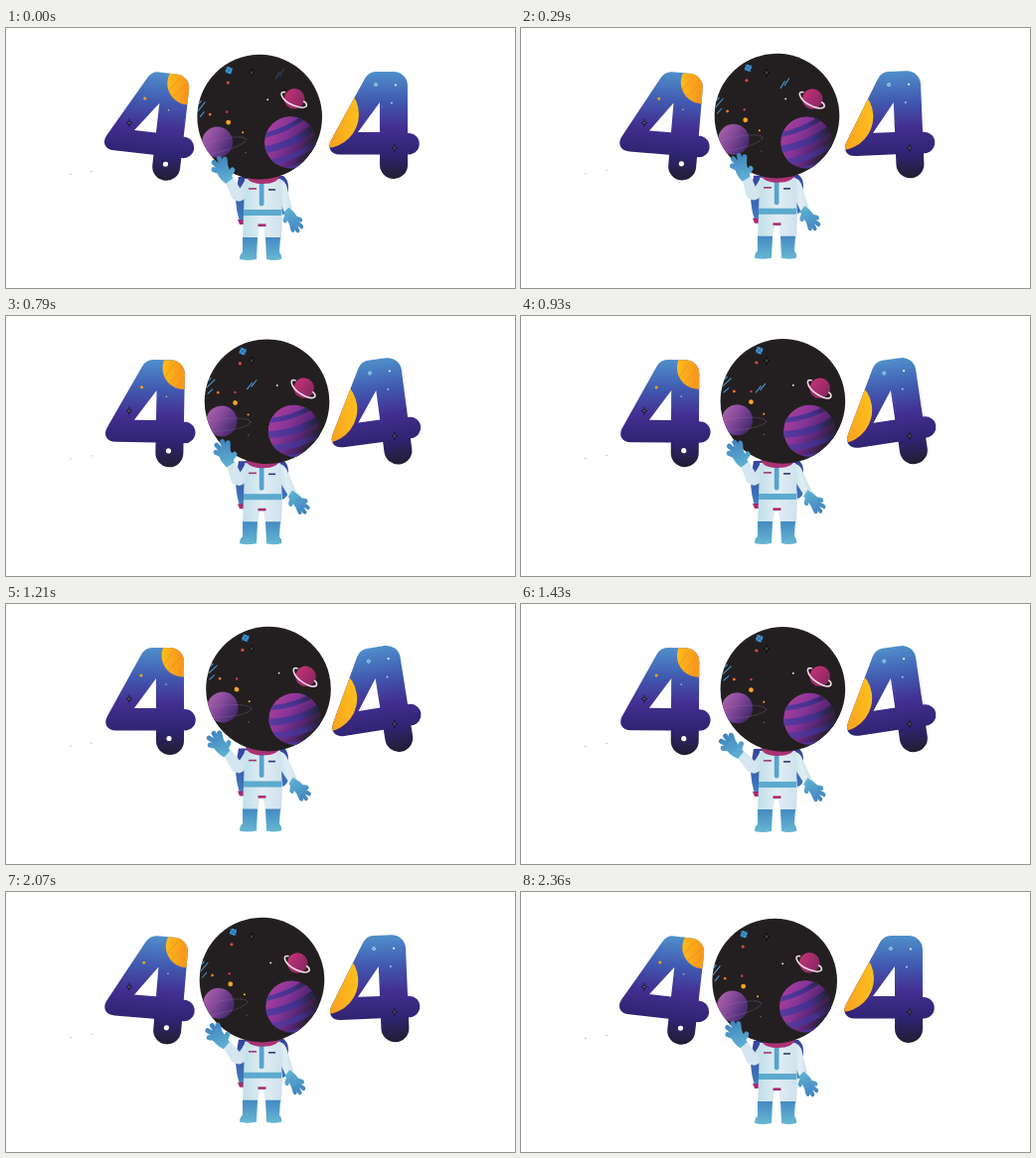
Write an HTML page that moves like this. It is 512 px wide and 262 px high and loops after 2430 ms.

```html
<!DOCTYPE html>
<html lang="en">
<head>
<meta charset="utf-8">
<title>404</title>
<style>
html, body { margin: 0; height: 100%; overflow: hidden; background: #fff; }
svg { display: block; width: 100%; height: 100%; }
.fingers { fill: none; stroke-width: 4.6; stroke-linecap: round; }
.meteor { fill: none; stroke: #4b9bd8; stroke-linecap: round; }
</style>
</head>
<body>
<svg viewBox="0 0 512 262">
  <defs>
    <linearGradient id="night" gradientUnits="userSpaceOnUse" x1="0" y1="0" x2="0" y2="108">
      <stop offset="0" stop-color="#4f8fca"/>
      <stop offset=".28" stop-color="#4159b0"/>
      <stop offset=".52" stop-color="#432f91"/>
      <stop offset=".77" stop-color="#2f2472"/>
      <stop offset="1" stop-color="#211e30"/>
    </linearGradient>
    <linearGradient id="sun" x2="1">
      <stop offset="0" stop-color="#fdbb1a"/>
      <stop offset=".45" stop-color="#f8981d"/>
      <stop offset="1" stop-color="#fdc01f"/>
    </linearGradient>
    <linearGradient id="giant" x2="1" y2=".45">
      <stop offset="0" stop-color="#b5429f"/>
      <stop offset=".45" stop-color="#873598"/>
      <stop offset=".75" stop-color="#562674"/>
      <stop offset="1" stop-color="#251f28"/>
    </linearGradient>
    <linearGradient id="band" gradientUnits="userSpaceOnUse" x1="4" y1="0" x2="58" y2="0">
      <stop offset="0" stop-color="#5c3aa2"/>
      <stop offset=".6" stop-color="#43308c"/>
      <stop offset="1" stop-color="#241f30"/>
    </linearGradient>
    <linearGradient id="violet" x2="1" y2=".5">
      <stop offset="0" stop-color="#b566ab"/>
      <stop offset=".5" stop-color="#864a9b"/>
      <stop offset="1" stop-color="#482c70"/>
    </linearGradient>
    <linearGradient id="red" x2="1" y2=".5">
      <stop offset="0" stop-color="#c9347a"/>
      <stop offset="1" stop-color="#8c2861"/>
    </linearGradient>
    <linearGradient id="glove" gradientUnits="userSpaceOnUse" x1="0" y1="-14" x2="0" y2="12">
      <stop offset="0" stop-color="#3f80bd"/>
      <stop offset="1" stop-color="#60b4d4"/>
    </linearGradient>
    <linearGradient id="boot" gradientUnits="userSpaceOnUse" x1="0" y1="208" x2="0" y2="234">
      <stop offset="0" stop-color="#4083c0"/>
      <stop offset="1" stop-color="#66b8d2"/>
    </linearGradient>
    <linearGradient id="pack" gradientUnits="userSpaceOnUse" x1="0" y1="148" x2="0" y2="198">
      <stop offset="0" stop-color="#35409c"/>
      <stop offset="1" stop-color="#3f84c4"/>
    </linearGradient>
    <linearGradient id="suit" x2="1">
      <stop offset="0" stop-color="#bfdfe7"/>
      <stop offset=".5" stop-color="#e0edf4"/>
      <stop offset="1" stop-color="#cfe1ed"/>
    </linearGradient>
    <path id="four" fill-rule="evenodd" d="M46 0H64A14 14 0 0 1 78 14V62H79A10.7 10.7 0 0 1 79 83.5H78V94A14 14 0 0 1 50 94V83.5H10C0 83.5-3 76 1 69L35 7Q39 0 46 0ZM50 31L28 61H50Z"/>
    <g id="spark">
      <path d="M0-5Q.4-.5 3.4 0Q.4.5 0 5Q-.4.5-3.4 0Q-.4-.5 0-5Z"/>
      <path d="M0-2V2M-1.5 0H1.5" stroke="#fff" stroke-width=".5" opacity=".6"/>
    </g>
    <g id="hand" stroke="url(#glove)" fill="url(#glove)">
      <path stroke="none" d="M-6-4Q0-9 6-2L7 9L-1 12Q-7 4-6-4Z"/>
      <path class="fingers" d="M-2 1L-8-3M-2-3L-6-9M1-3L0-11M3 0L5-9M4 6L9 2"/>
    </g>
    <clipPath id="fourClip"><use href="#four" clip-rule="evenodd"/></clipPath>
    <clipPath id="headClip"><circle r="62.8"/></clipPath>
    <clipPath id="giantClip"><circle cx="31" cy="25.5" r="26.2"/></clipPath>
  </defs>

  <g id="specks" fill="#999"><circle cx="65" cy="147.5" r=".6"/><circle cx="86" cy="144.5" r=".6"/></g>

  <g id="left">
    <use href="#four" fill="url(#night)"/>
    <g clip-path="url(#fourClip)">
      <circle cx="77" cy="8" r="21.5" fill="url(#sun)"/>
      <path d="M58 17L67 4M62 24L75 9M69 28L78 17" stroke="#f08f1c" stroke-width=".8"/>
    </g>
    <circle cx="35" cy="28" r="1.5" fill="#f9a51d"/>
    <circle cx="60" cy="37" r=".8" fill="#e4b6a0"/>
    <circle cx="63" cy="91.5" r="2.6" fill="#fff"/>
  </g>

  <g id="right">
    <use href="#four" fill="url(#night)"/>
    <circle clip-path="url(#fourClip)" cx="-5" cy="43" r="34" fill="url(#sun)"/>
    <circle cx="46" cy="13" r="1.6" fill="#5fb5e0" stroke="#a4dcf2" stroke-width=".7"/>
    <circle cx="66" cy="13.5" r="1" fill="#fff"/>
    <circle cx="62" cy="31.5" r=".9" fill="#b9dcf0"/>
  </g>
  <use href="#spark" x="124" y="95.5" fill="#0c0a1a"/>
  <use href="#spark" x="391" y="121" fill="#0c0a1a"/>

  <g id="body">
    <path d="M234 150H245V197H236Q231 185 231 168ZM272 149H279Q284 153 284 160V181Q283 189 272 190Z" fill="url(#pack)"/>
    <path d="M233 193H241V198H235ZM272 196H277V201H272Z" fill="#a82a72"/>
    <g id="rightArm">
      <path d="M273 152Q281 152 283 162L288 182L280 186L272 167Z" fill="url(#suit)"/>
      <use href="#hand" transform="translate(288.5 193) rotate(157) scale(.86 1.08)"/>
    </g>
    <path d="M240 152H276L278 190L277 213H261L259 201H255L253 213H238L239 188Z" fill="url(#suit)"/>
    <path d="M253.5 197.5H261.5V200H253.5Z" fill="#a82a72"/>
    <path d="M239 183H277V189H239Z" fill="#5caace"/>
    <path d="M238 211H253L252 233Q243 235 235 233Q235 228 238 226ZM261 211H276L275 226Q278 229 277 233Q269 235 262 233Z" fill="url(#boot)"/>
    <path d="M254.8 151H259.5V178Q257 181 254.8 178Z" fill="#58a3ce"/>
    <path d="M244 162H252" stroke="#9d3777" stroke-width="1.6"/>
    <path d="M264 163H271" stroke="#35376e" stroke-width="1.6"/>
    <path d="M241 147H276Q275 157 258 157Q242 157 241 147Z" fill="#a93375"/>
  </g>

  <g id="head">
    <circle r="62.8" fill="#231f20"/>
    <g clip-path="url(#headClip)">
      <g clip-path="url(#giantClip)">
        <circle cx="31" cy="25.5" r="26.2" fill="url(#giant)"/>
        <g transform="rotate(-19 31 25.5)" fill="none" stroke="url(#band)">
          <path d="M3 10Q31 14 58 4" stroke-width="5"/>
          <path d="M2 24Q33 29 60 18" stroke-width="7"/>
          <path d="M4 38Q34 43 61 32" stroke-width="6"/>
          <path d="M8 49Q37 54 58 45" stroke-width="4"/>
        </g>
      </g>
      <circle cx="-42.5" cy="25.5" r="15.5" fill="url(#violet)"/>
      <ellipse cx="-40" cy="29" rx="27" ry="6" transform="rotate(-14 -40 29)" fill="none" stroke="#9871b0" stroke-width=".7" stroke-dasharray="1 1.4"/>
      <path class="meteor" d="M-62-6L-55-15M-60 0L-56-5M-63-11L-59-16" stroke-width="1"/>
    </g>
    <circle cx="35" cy="-18.5" r="10.3" fill="url(#red)"/>
    <path d="M26-25Q21-26 22-22C25-13 43-7 47-11Q48-14 44-16" fill="none" stroke="#f3dce8" stroke-width="1.6"/>
    <g transform="translate(-31 -47) rotate(20)">
      <rect x="-3" y="-3" width="6" height="6" rx="1" fill="#419cd6"/>
      <path d="M-4-2L4 2M-2 4L2-4" stroke="#2769a5" stroke-width=".9"/>
    </g>
    <circle cx="-31.5" cy="5.5" r="2.4" fill="#f9a51d"/>
    <circle cx="-50" cy="-2.5" r="1.4" fill="#ee7c26"/>
    <circle cx="-32" cy="-34.5" r="1.6" fill="#d94b41"/>
    <circle cx="-33" cy="-5" r="1.3" fill="#c43b50"/>
    <circle cx="-17" cy="15.5" r="1" fill="#f5b62a"/>
    <circle cx="8" cy="-17.5" r=".9" fill="#f5e9d2"/>
    <circle cx="-14" cy="36" r=".6" fill="#857d84"/>
    <path id="meteor" class="meteor" d="M-3 5L1-2M1 2L5-5" stroke-width="1.1"/>
  </g>
  <use href="#spark" x="247" y="45" fill="#000"/>

  <g id="armLift">
    <path d="M241 152Q237 160 234 163L230 172Q234 178 241 171Z" fill="#cfe3ec"/>
    <g id="wave">
      <path d="M220 154L228 150L238 166Q238 174 232 174Q228 174 226 169Z" fill="#d4e7f0"/>
      <use href="#hand" transform="translate(217.5 144) rotate(-18) scale(1.06 1.14)"/>
    </g>
  </g>
</svg>
<script>
const LOOP = 2430, STEPS = 34;
const $ = id => document.getElementById(id);
const move = (id, value) => $(id).setAttribute('transform', value);

function draw(time) {
  const step = Math.floor((time % LOOP + 6) * STEPS / LOOP) % STEPS;
  const phase = (step + .5) / STEPS;
  const half = 1 - Math.abs(1 - 2 * phase);
  const p = (1 - Math.cos(Math.PI * half ** .8)) / 2;   // 0 = low, 1 = high
  const swing = Math.sin(2 * Math.PI * (phase + .04));
  const lift = `translate(0 ${-4.4 * p})`;

  move('left', `translate(${101.7 - .7 * p} ${46 - 2 * p}) rotate(${6.5 * (1 - p)} 63 54)`);
  move('right', `translate(${326 - p} ${44 - 2.5 * p}) rotate(${-9 * p} 63.5 54)`);
  move('head', `translate(${255.1 + 8.9 * p} ${89.7 - 4.1 * p}) rotate(${9.2 * p})`);
  move('specks', lift);
  move('body', lift);
  move('armLift', lift);
  move('rightArm', `rotate(${-11 * p} 278 158)`);
  move('wave', `rotate(${-3 + 13 * swing} 232 169)`);
  move('meteor', `translate(${19 - 3.4 * step} ${-43.5 + 2.6 * step})`);
  $('meteor').style.opacity = Math.max(0, Math.min(1, (step + 2) / 6, (17 - step) / 4));
}

const start = performance.now();
function tick(now) {
  draw(Math.max(0, now - start));
  requestAnimationFrame(tick);
}
draw(0);
requestAnimationFrame(tick);
</script>
</body>
</html>
```
